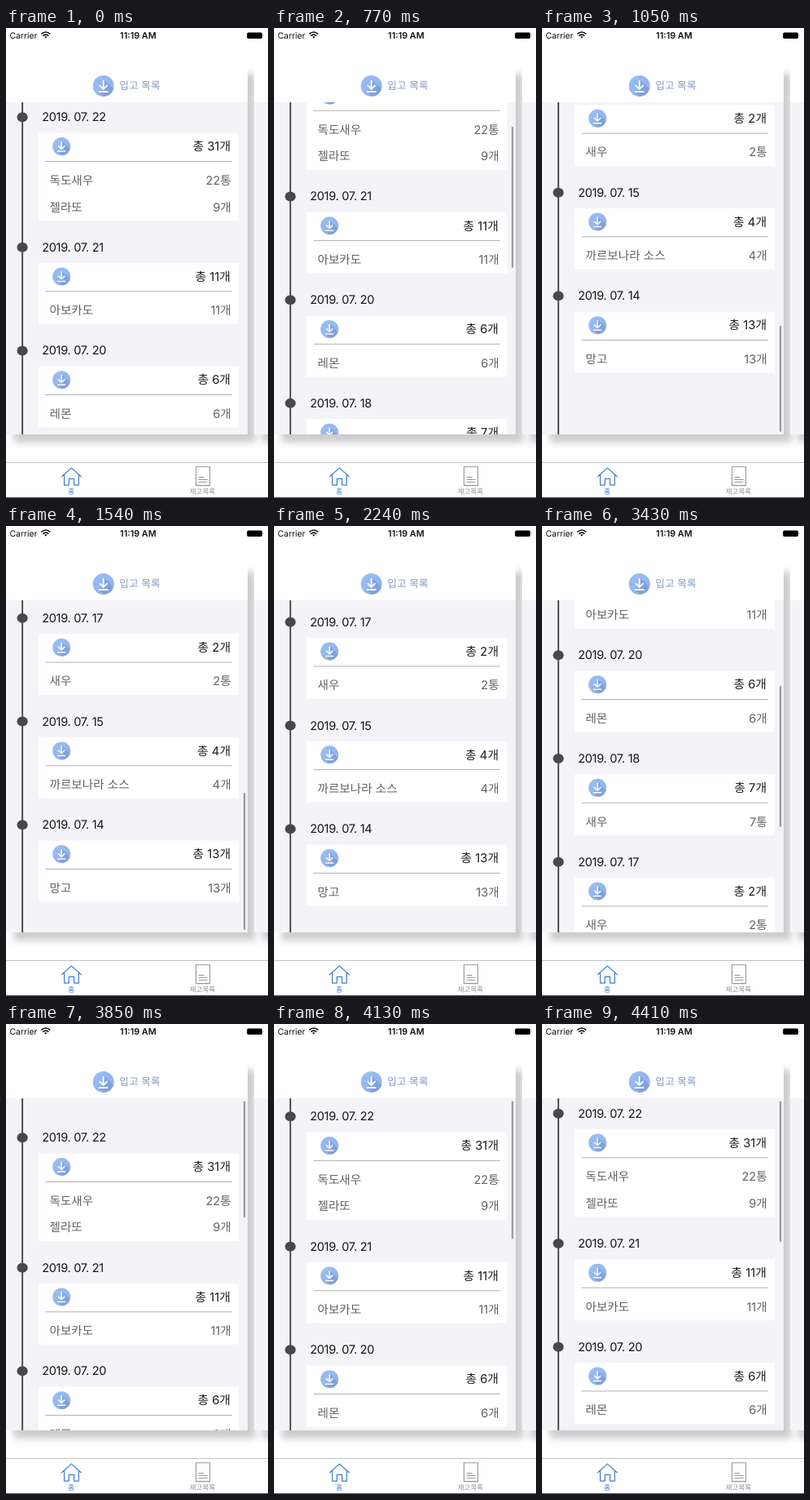
These frames come from a looping animation (322 by 576 pixels, 4480 ms). An HTML page:

```html
<!DOCTYPE html>
<html lang="ko">
<head>
<meta charset="utf-8">
<title>입고 목록</title>
<style>
  html, body { margin: 0; width: 100%; height: 100%; overflow: hidden; background: #fff; }
  svg { display: block; width: 322px; height: 576px; }
  text { font-family: Inter, "Noto Sans CJK KR", "Noto Sans CJK", sans-serif; font-size: 14.6px; text-rendering: geometricPrecision; }
  .date { fill: #151517; letter-spacing: -.4px; word-spacing: .4px; }
  .total { fill: #1c1c1e; font-size: 14.8px; }
  .item { fill: #626264; }
  .end { text-anchor: end; }
  .mid { text-anchor: middle; }
  .status { font-size: 10.4px; fill: #111; }
  .clock { font-size: 10.8px; font-weight: 600; }
  .tab { font-size: 8.5px; }
</style>
</head>
<body>
<svg viewBox="0 0 322 576">
  <defs>
    <clipPath id="view"><rect y="91" width="297" height="407"/></clipPath>
    <clipPath id="disc"><circle r="11"/></clipPath>
    <filter id="shade" x="-20%" y="-20%" width="140%" height="140%">
      <feDropShadow dx="9.5" dy="10" stdDeviation="4.3" flood-color="#000" flood-opacity=".2"/>
    </filter>
    <linearGradient id="blue" x2="1" y2="1">
      <stop offset="0" stop-color="#9cc0f3"/><stop offset="1" stop-color="#8aaeea"/>
    </linearGradient>
    <g id="down">
      <circle r="11" fill="url(#blue)"/>
      <path d="M1-6L13 6V13H3L-5 6L0 3Z" fill="#7590cb" opacity=".5" clip-path="url(#disc)"/>
      <path d="M0-6V3M-4.2-.8L0 3.3L4.2-.8M-5 6H5" fill="none" stroke="#fff" stroke-width="1.5"/>
    </g>
  </defs>

  <rect width="322" height="576" fill="#fff"/>

  <!-- pages -->
  <rect y="46" width="297" height="452" fill="#fff" filter="url(#shade)"/>
  <rect x="305" y="46" width="297" height="452" fill="#fff" filter="url(#shade)"/>
  <path d="M0 91H297V498H0ZM305 91H322V498H305Z" fill="#f4f3f8"/>
  <use href="#down" transform="translate(119.7 71) scale(1.18)"/>
  <text x="139.3" y="75.4" style="font-size:12.7px" fill="#8799c4">입고 목록</text>

  <!-- timeline -->
  <g clip-path="url(#view)">
    <rect x="19.2" y="91" width="1.9" height="407" fill="#4a474c"/>
    <g id="list"></g>
    <rect id="bar" x="291.9" width="2.3" rx="1.15" fill="#000" opacity="0"/>
  </g>

  <!-- status bar -->
  <text class="status" x="4.5" y="12.6">Carrier</text>
  <g fill="none" stroke="#111" stroke-width="1.6">
    <path d="M43.3 7.4Q48.8 2.6 54.3 7.4M45.3 9.6Q48.8 6.6 52.3 9.6"/>
    <path d="M47 10.8Q48.8 9.5 50.6 10.8L48.8 12.8Z" fill="#111" stroke="none"/>
  </g>
  <text class="status clock mid" x="162.4" y="12.7">11:19 AM</text>
  <rect x="296.2" y="5.4" width="18.8" height="7.6" rx="1.8" fill="#000"/>
  <path d="M316 7.8Q317.6 9.3 316 10.8Z" fill="#777"/>

  <!-- tab bar -->
  <rect y="532" width="322" height="44" fill="#fefefe"/>
  <rect y="532" width="322" height=".8" fill="#b5b5b7"/>
  <path transform="translate(.6 .3)" d="M68 549.5L79.8 538.8L91.8 549.5M71 547.5V559.8H76.8V552H83V559.8H88.8V547.5" fill="none" stroke="#3f7fd0" stroke-width="1.2" stroke-linejoin="round" stroke-linecap="round"/>
  <text class="tab mid" x="80.2" y="571.3" fill="#3f7fd0" font-weight="500">홈</text>
  <path d="M233.5 537.8H250.5V560.6H233.5ZM236.8 550.5H243.5M236.8 553.5H247.5M236.8 556.5H247.5" fill="none" stroke="#98989a" stroke-width="1.1"/>
  <text class="tab mid" x="241.4" y="571.4" fill="#929294">재고목록</text>
  <rect y="575" width="322" height="1" fill="#555"/>
</svg>

<script>
const LOOP = 4480, STEP = 70, ROW = 32.7, BASE = 94, MAX = 531;
const TRACK = { top: 94.4, bottom: 495, length: 173 };
const days = [
  ["22", "31개", ["독도새우", "22통"], ["젤라또", "9개"]],
  ["21", "11개", ["아보카도", "11개"]],
  ["20", "6개", ["레몬", "6개"]],
  ["18", "7개", ["새우", "7통"]],
  ["17", "2개", ["새우", "2통"]],
  ["15", "4개", ["까르보나라 소스", "4개"]],
  ["14", "13개", ["망고", "13개"]]
];
const list = document.getElementById("list");
const bar = document.getElementById("bar");

const label = (cls, x, y, s) => `<text class="${cls}" x="${x}" y="${y}">${s}</text>`;

// Each day is laid out around the centre line of its date.
let top0 = 109;
list.innerHTML = days.map(([day, total, ...items]) => {
  const rows = items.map(([name, count], i) => {
    const y = 82.8 + i * ROW;
    return label("item", 53.5, y, name) + label("item end", 276.7, y, count);
  }).join("");
  const group = `<g transform="translate(0 ${top0})">
    <ellipse cx="20.1" cy=".3" rx="6.6" ry="6" fill="#4a474c"/>
    ${label("date", 44.3, 5.3, `2019. 07. ${day}`)}
    <rect x="40" y="19.7" width="246.3" height="${42 + ROW * items.length}" fill="#fff"/>
    <use href="#down" x="68.2" y="36.1"/>
    ${label("total end", 276, 41.4, `총 ${total}`)}
    <rect x="48.5" y="54" width="229.5" height=".9" fill="#a9a9ab"/>
    ${rows}</g>`;
  top0 += BASE + ROW * items.length;
  return group;
}).join("");

const clamp = (v, lo, hi) => Math.min(hi, Math.max(lo, v));

// Distance scrolled: a drag from start to hit, then a damped bounce past the edge.
function fling(t, start, hit, v0, v1) {
  if (t <= start) return 0;
  if (t >= hit) {
    const s = (t - hit) / 1000;
    return MAX + v1 * s * Math.exp(-10 * s);
  }
  const span = (hit - start) / 1000, u = (t - start) / (hit - start);
  return MAX * u * u * (3 - 2 * u) + v0 * span * u * (1 - u) ** 2 + v1 * span * u * u * (u - 1);
}

function offsetAt(t) {
  return t < 3150 ? fling(t, 700, 1016, 400, 1770) : MAX - fling(t, 3150, 3610, 817, 1376);
}

function barAlpha(t) {
  if (t > 3150) return 1;
  return t > 700 ? clamp((2030 - t) / 185, 0, 1) : 0;
}

function draw(t) {
  const y = offsetAt(t), inside = clamp(y, 0, MAX);
  const length = TRACK.length - Math.abs(y - inside);
  const travel = TRACK.bottom - TRACK.top - length;
  list.setAttribute("transform", `translate(0 ${-y.toFixed(2)})`);
  bar.setAttribute("y", TRACK.top + travel * inside / MAX);
  bar.setAttribute("height", length);
  bar.setAttribute("opacity", .36 * barAlpha(t));
}

const begin = performance.now();
function tick() {
  const t = (performance.now() - begin) % LOOP;
  draw(Math.floor(t / STEP) * STEP);
  requestAnimationFrame(tick);
}
draw(0);
requestAnimationFrame(tick);
</script>
</body>
</html>
```
